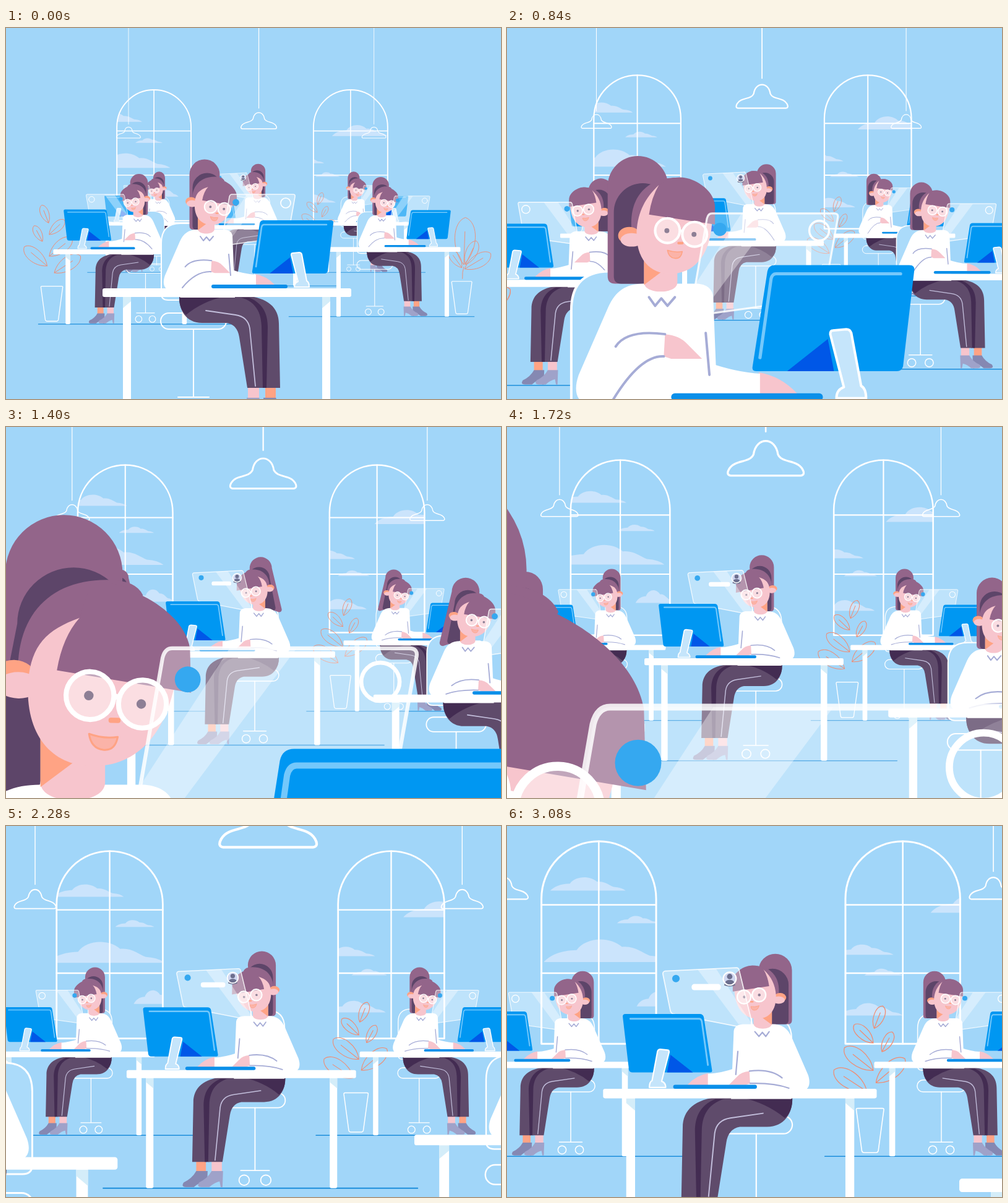
An HTML page with a canvas that plays this animation: 800 px wide and 600 px high, repeating every 3.12 s.

```html
<!DOCTYPE html>
<html lang="en">
<head>
<meta charset="utf-8">
<title>Office fly-through</title>
<style>
html, body { margin: 0; width: 100%; height: 100%; overflow: hidden; background: #a1d6f9; }
canvas { display: block; }
</style>
</head>
<body>
<canvas id="stage" width="800" height="600"></canvas>
<script>
const ctx = document.getElementById('stage').getContext('2d');
const LOOP = 3120, STEP = 40, HORIZON = 238;
const C = {
  sky: '#a1d6f9', cloud: '#cbe4fc', white: '#ffffff', floor: '#1c8edc',
  hair: '#93658a', hairDark: '#5d4569', skin: '#f7c5cd', blush: '#ffa384',
  line: '#a6acd6', trousers: '#5f4b6b', trousersDark: '#432c52',
  shoe: '#9fa2c9', shoeDark: '#8588b2', blue: '#0097f2', blueDark: '#0057e7',
  keys: '#0a8fe9', coral: '#f08c73', badge: '#35a8f0', eye: '#8d7f95'
};

// ---------- helpers ----------
const shape = (d) => new Path2D(d);

function fill(path, color) {
  ctx.fillStyle = color;
  ctx.fill(path);
}

function stroke(path, color, width) {
  ctx.strokeStyle = color;
  ctx.lineWidth = width;
  ctx.stroke(path);
}

function disc(x, y, rx, ry = rx) {
  const p = new Path2D();
  p.ellipse(x, y, rx, ry, 0, 0, Math.PI * 2);
  return p;
}

function box(x, y, w, h, r) {
  const p = new Path2D();
  p.roundRect(x, y, w, h, r);
  return p;
}

// Smooth bump: 1 at distance 0, 0 beyond the half width.
function bump(d, half) {
  return Math.abs(d) < half ? (1 + Math.cos(Math.PI * d / half)) / 2 : 0;
}

const clamp = (v) => Math.max(0, Math.min(1, v));

// ---------- camera ----------
const cameraZ = (t) => 1.61 * (1 - Math.exp(-t / 2268));

function place(t, x, y, z, flip) {
  const depth = z - cameraZ(t);
  if (depth < 0.03) return false;
  const s = 1 / depth;
  const vx = 398 - 4 * t / 3080;
  ctx.setTransform(flip ? -s : s, 0, 0, s, vx + x * s, HORIZON + y * s);
  return true;
}

// ---------- room ----------
const PANE = 406;
const frame = shape('M-203 250V-264A203 203 0 0 1 203 -264V250Z');
const bars = shape('M0 -467V250M-203 -242H203M-203 0H203');
const puff = shape('M0 0C.05 -.3 .13 -.5 .26 -.52C.33 -1.08 .52 -1.15 .62 -.66C.72 -.72 .78 -.4 .84 -.28Q.95 -.24 1 0Z');

// left edge, width, base, height, drift per second (in pane widths)
const leftSky = [
  [-.817, .657, -.72, .118, .128],
  [-.25, .366, -.435, .065, .133],
  [-.88, 1.1, -.097, .2, .13],
  [-.07, .4, .29, .13, .13]
];
const rightSky = [
  [-.25, .75, -.527, .15, .16],
  [-.858, .5, -.16, .09, .09],
  [-.475, .33, .02, .06, .046],
  [-.75, .55, .37, .11, .065]
];

function drawWindow(t, x, sky) {
  place(t, x, 0, 3.386);
  ctx.save();
  ctx.clip(frame);
  for (const [left, w, base, h, drift] of sky) {
    ctx.save();
    ctx.translate((left + drift * t / 1000) * PANE, base * PANE);
    ctx.scale(w * PANE, h * PANE);
    fill(puff, C.cloud);
    ctx.restore();
  }
  ctx.restore();
  stroke(bars, C.white, 5.5);
  stroke(frame, C.white, 6.5);
}

const shade = shape('M-43 0Q-49 -1 -45 -8C-38 -20 -20 -15 -15 -26C-12 -48 12 -48 15 -26C20 -15 38 -20 45 -8Q49 -1 43 0Z');
const cord = shape('M0 -54V-2000');

function drawLamp(t, x, y, z) {
  if (!place(t, x, y, z)) return;
  stroke(cord, C.white, 2);
  stroke(shade, C.white, 2.5);
}

// ---------- plants ----------
const tallLeaves = [
  [9, -272, 28, -321], [7, -240, -35, -280], [26, -221, 49, -264],
  [7, -180, -56, -230], [13, -153, 76, -206], [-7, -134, -79, -181]
];
const wideLeaves = [
  [6, -147, 11, -287], [9, -134, 86, -180], [0, -138, -37, -190], [11, -147, 44, -217]
];
const vase = shape('M-27 -97H27Q31 -97 30 -93L18 -4Q17 0 13 0H-13Q-17 0 -18 -4L-30 -93Q-31 -97 -27 -97Z');
const stem = shape('M2 -105Q1 -125 6 -140');

function drawLeaf([x0, y0, x1, y1]) {
  const dx = x1 - x0, dy = y1 - y0;
  const at = (k, side) => [x0 + dx * k - dy * side, y0 + dy * k + dx * side];
  const p = new Path2D();
  p.moveTo(x0, y0);
  p.bezierCurveTo(...at(.3, .3), ...at(.9, .3), x1, y1);
  p.bezierCurveTo(...at(.9, -.28), ...at(.3, -.28), x0, y0);
  p.lineTo(...at(.7, 0));
  stroke(p, C.coral, 1.7);
}

function drawPlant(x, leaves) {
  ctx.save();
  ctx.translate(x, 192);
  stroke(vase, C.white, 2.2);
  leaves.forEach(drawLeaf);
  if (leaves === wideLeaves) stroke(stem, C.coral, 1.7);
  ctx.restore();
}

// ---------- chair and desk ----------
const chairBack = shape('M-18 -112C-42 -112 -49 -98 -49 -80V2Q-49 12 -38 12H10V-112Z');
const chairBase = shape('M3 59V169M-22 169H28');

function drawChair(x) {
  ctx.save();
  ctx.translate(x, 0);
  fill(chairBack, '#abdbfa');
  stroke(chairBack, C.white, 2);
  stroke(box(-50, 33, 106, 26, 13), C.white, 2);
  stroke(chairBase, C.white, 2);
  for (const wx of [-16, 22]) stroke(disc(wx, 186, 9), C.white, 2);
  ctx.restore();
}

const legShade = shape('M-168 7H-155V14L-168 25ZM154 7H167V14L154 25Z');

function drawDesk() {
  fill(box(-168, 0, 13, 200, 3), C.white);
  fill(box(154, 0, 13, 200, 3), C.white);
  fill(legShade, '#d4edf9');
  fill(box(-201, -7, 402, 14, 3), C.white);
}

const screen = shape('M59 -117H168Q173 -117 172 -112L163 -35Q162 -31 158 -31H44Q40 -31 41 -35L53 -112Q54 -117 59 -117Z');
const glint = shape('M161 -110H60Q57 -110 56 -106L47 -42');
const facet = shape('M69 -31L102 -57L107 -31Z');
const stand = shape('M106 -64L117 -65Q120 -65 121 -62L129 -19Q133 -17 133 -9H109Q109 -16 115 -18L104 -61Q104 -64 106 -64Z');

function drawMonitor() {
  fill(screen, C.blue);
  stroke(glint, '#74c8fb', 2.6);
  fill(facet, C.blueDark);
  fill(stand, '#c5e5fb');
  stroke(stand, C.white, 2);
}

// ---------- hologram ----------
const glass = shape('M8 -159H107Q111 -159 110 -155L99 -93Q98 -90 95 -90L-6 -76Q-10 -76 -9 -80L4 -155Q5 -159 8 -159Z');
const bigGlass = shape('M5 -185L110 -180Q114 -179 113 -175L102 -121Q101 -118 98 -117L-15 -95Q-20 -95 -19 -99L1 -181Q2 -185 5 -185Z');
const sheen = shape('M32 -159H60L-2 -76H-22Z');
const bust = shape('M7 -159C8 -166 11 -167 15 -167S22 -166 23 -159Q15 -156 7 -159Z');

function drawHologram(t, big) {
  const pane = big ? bigGlass : glass;
  ctx.save();
  ctx.clip(pane);
  fill(pane, 'rgba(255,255,255,.3)');
  if (big) ctx.translate(4, -26);
  fill(sheen, 'rgba(255,255,255,.36)');
  ctx.restore();
  stroke(pane, 'rgba(255,255,255,.85)', 1.6);
  if (big) {
    fill(disc(94, -169, 5.5), C.badge);
    fill(disc(15, -169, 9), '#cfd6ef');
    fill(disc(15, -172, 4), '#6c6f8e');
    fill(bust, '#6c6f8e');
    stroke(disc(15, -169, 9.5), C.white, 2);
    const grow = clamp((t - 1000) / 200);
    if (grow > 0) fill(box(49.5 - 21.5 * grow, -161, 43 * grow, 9, 4), C.white);
  } else {
    fill(disc(14.5, -146, 5.4), C.badge);
    stroke(disc(95, -145, 8), C.white, 1.7);
  }
}

// ---------- worker ----------
const farLeg = shape('M-40 5H30C66 8 84 24 84 50L86 154H60L48 50Z');
const legGap = shape('M0 8H36C60 18 66 36 66 56L64 154H56L40 50Z');
const nearLeg = shape('M-77 5H10C44 10 55 28 56 54L58 154H33L20 72Q17 52 0 49H-40C-66 49 -78 28 -77 5Z');
const hipShade = shape('M-77 5H0Q-40 14 -66 36Q-78 26 -77 5Z');
const seam = shape('M-34 29L14 36Q34 39 37 58L46 151');
const shoe = shape('M32 170H52Q59 183 74 190Q79 198 70 198H56Q47 190 38 188L36 198H33Z');

function drawLegs() {
  fill(box(62, 150, 17, 26, 3), C.blush);
  fill(box(34, 150, 18, 26, 3), C.skin);
  ctx.save();
  ctx.translate(27, 0);
  fill(shoe, C.shoeDark);
  ctx.restore();
  fill(shoe, C.shoe);
  fill(farLeg, C.trousers);
  fill(legGap, C.trousersDark);
  fill(nearLeg, C.trousers);
  fill(hipShade, C.trousersDark);
  stroke(seam, '#c3bfdc', 1.8);
}

const torso = shape('M-47 -102C-62 -102 -70 -96 -76 -83L-100 -28C-105 -14 -101 -4 -90 -4L-75 8H13L9 -92C8 -99 2 -102 -5 -102Z');
const collar = shape('M-43 -91L-38 -84L-33 -90L-28 -84L-22 -91');
const neck = shape('M-47 -128H-20V-103C-20 -93 -47 -93 -47 -103Z');
const neckShade = shape('M-47 -123L-31 -113L-47 -101Z');
const farSleeve = shape('M5 -38Q28 -30 47 -29V-7H-10Z');
const farHand = shape('M46 -30Q64 -27 77 -13L74 -8H46Z');
const nearHand = shape('M-14 -9Q-2 -8 4 -1L16 11H-9L-15 9Z');

function drawTorso() {
  fill(torso, C.white);
  fill(neck, C.skin);
  fill(neckShade, C.blush);
  stroke(collar, C.line, 2);
}

function drawArms(raise) {
  fill(farHand, C.skin);
  fill(farSleeve, C.white);
  const hx = -16 * raise, hy = -24 - 28 * raise;
  ctx.save();
  ctx.translate(hx, hy);
  fill(nearHand, C.skin);
  ctx.restore();
  const p = new Path2D();
  p.moveTo(-62 + hx / 2, hy + 1);
  p.quadraticCurveTo(-45 + hx, hy - 13, -14 + hx, hy - 9);
  p.moveTo(-72, -8);
  p.quadraticCurveTo(-50, hy + 8, -15 + hx, hy + 9);
  p.moveTo(3, -62);
  p.lineTo(6, -28);
  stroke(p, C.line, 2);
}

// The tip trails behind the bun by the swing distance.
function ponytail(x, y, r, swing) {
  const left = x - r - swing, right = -42 - swing * .4, end = -102 + swing * .4;
  const p = new Path2D();
  p.moveTo(x - r, y);
  p.arc(x, y, r, Math.PI, 0);
  p.quadraticCurveTo(x + r, y + 24, -40, -140);
  p.lineTo(right, -102);
  p.lineTo(left + 6, end);
  p.quadraticCurveTo(left, end, left, end - 6);
  p.closePath();
  return p;
}

function drawPonytail(nod, swing) {
  const x = -52 + 16 * nod, y = -181 - 10 * nod;
  fill(ponytail(x, y, 24.5, swing), C.hair);
  fill(ponytail(x + 4, y + 21, 23.5, swing * .6), C.hairDark);
}

const cap = shape('M-56 -138C-62 -168 -48 -188 -20 -188Q-9 -188 -6 -182L-20 -150Z');
const mouth = shape('M-28 -129Q-22 -127 -16 -128Q-17 -122 -22 -122.5Q-27 -123 -28 -129Z');
const bridge = shape('M-18 -144Q-17 -146 -16 -144');
const lashes = shape('M-31 -144Q-28 -148 -25 -144M-8 -141Q-5 -145 -2 -141');

function facePath(n) {
  const p = new Path2D();
  p.moveTo(-35 + 3 * n, -182 + 11 * n);
  p.bezierCurveTo(-46, -172 + 6 * n, -52, -160, -53, -145);
  p.bezierCurveTo(-54, -122, -42, -110, -26, -110);
  p.bezierCurveTo(-7, -110, 6, -124, 8 + n, -150);
  p.lineTo(0, -170);
  p.closePath();
  return p;
}

function fringePath(n) {
  const p = new Path2D();
  p.moveTo(-43 + 2 * n, -158 + 9 * n);
  p.quadraticCurveTo(-41 + 2 * n, -172 + 9 * n, -35 + 3 * n, -182 + 11 * n);
  p.lineTo(-28, -187 + n);
  p.quadraticCurveTo(-16, -190 + 2 * n, -7.5, -186 + 4 * n);
  p.bezierCurveTo(2, -182 + 4 * n, 10.5 + 2 * n, -174 + 4 * n, 10.5 + 4 * n, -164 + 4 * n);
  p.lineTo(10.5 + 5 * n, -150 + 9 * n);
  p.closePath();
  return p;
}

// Nodding slides the features down the face while the ear rises.
function drawHead(nod, blink) {
  ctx.save();
  ctx.translate(-35, -108);
  ctx.rotate(nod * 1.5 * Math.PI / 180);
  ctx.translate(35, 108);
  fill(cap, C.hair);
  const ear = -141 - 6 * nod;
  fill(disc(-59, ear, 9, 7), C.blush);
  fill(disc(-57, ear + 3.5, 9, 5.5), C.skin);
  fill(facePath(nod), C.skin);
  fill(fringePath(nod), C.hair);
  ctx.translate(nod, 6 * nod);
  for (const [x, y] of [[-28, -145], [-6, -142]]) {
    const lens = disc(x, y, 10);
    fill(lens, 'rgba(255,255,255,.42)');
    if (!blink) fill(disc(x - .5, y, 2), C.eye);
    stroke(lens, C.white, 2.1);
  }
  if (blink) stroke(lashes, C.eye, 1);
  stroke(bridge, C.white, 2);
  fill(box(-20, -136, 5, 2.2, 1), C.blush);
  fill(mouth, '#fbb3a8');
  stroke(mouth, C.blush, .8);
  ctx.restore();
}

// ---------- workstation ----------
function drawStation(t, st) {
  if (!place(t, st.x, st.y, st.z, st.flip)) return;
  const beat = t % 2240;
  const nod = 1 - bump(t - 840, 680) - bump(t - 3080, 680);
  const swing = 22 * bump(t - 1380, 340);
  const raise = .7 * bump(t + 50, 400) + bump(t - 840, 450);
  const blink = beat >= 440 && beat < 540;
  const shift = st.shift || 0;

  stroke(shape('M-309 200H242'), C.floor, 2);
  if (st.leaves) drawPlant(st.plant, st.leaves);
  drawChair(st.chair || -57);
  ctx.save();
  ctx.translate(shift, 0);
  drawLegs();
  drawPonytail(nod, swing);
  drawTorso();
  drawHead(nod, blink);
  ctx.restore();
  drawDesk();
  ctx.save();
  ctx.translate(shift, 0);
  drawArms(raise);
  fill(box(-25, -13, 123, 6, 3), C.keys);
  drawHologram(t, st.big);
  ctx.restore();
  drawMonitor();
}

const backRow = [
  { x: -437, y: 201, z: 2.55, flip: true, shift: -17, chair: -46 },
  { x: 471, y: 201, z: 2.55, shift: -17, plant: -210, leaves: tallLeaves }
];
const frontRows = [
  { x: -16, y: 177, z: 2.105, flip: true, chair: -27, big: true },
  { x: 418, y: 221, z: 1.84, plant: 205, leaves: wideLeaves },
  { x: -349, y: 212, z: 1.71, flip: true, plant: 205, leaves: tallLeaves }
];
const nearest = { x: -41, y: 190, z: 1 };

function render(t) {
  ctx.setTransform(1, 0, 0, 1, 0, 0);
  ctx.fillStyle = C.sky;
  ctx.fillRect(0, 0, 800, 600);
  drawWindow(t, -538, leftSky);
  drawWindow(t, 538, rightSky);
  backRow.forEach((st) => drawStation(t, st));
  drawLamp(t, -480, -144, 2.4);
  drawLamp(t, 472, -144, 2.4);
  frontRows.forEach((st) => drawStation(t, st));
  drawLamp(t, 17, -121, 1.615);
  drawStation(t, nearest);
}

ctx.lineCap = 'round';
ctx.lineJoin = 'round';
const start = performance.now();

function tick() {
  const t = (performance.now() - start) % LOOP;
  render(Math.floor(t / STEP) * STEP);
  requestAnimationFrame(tick);
}
render(0);
requestAnimationFrame(tick);
</script>
</body>
</html>
```
